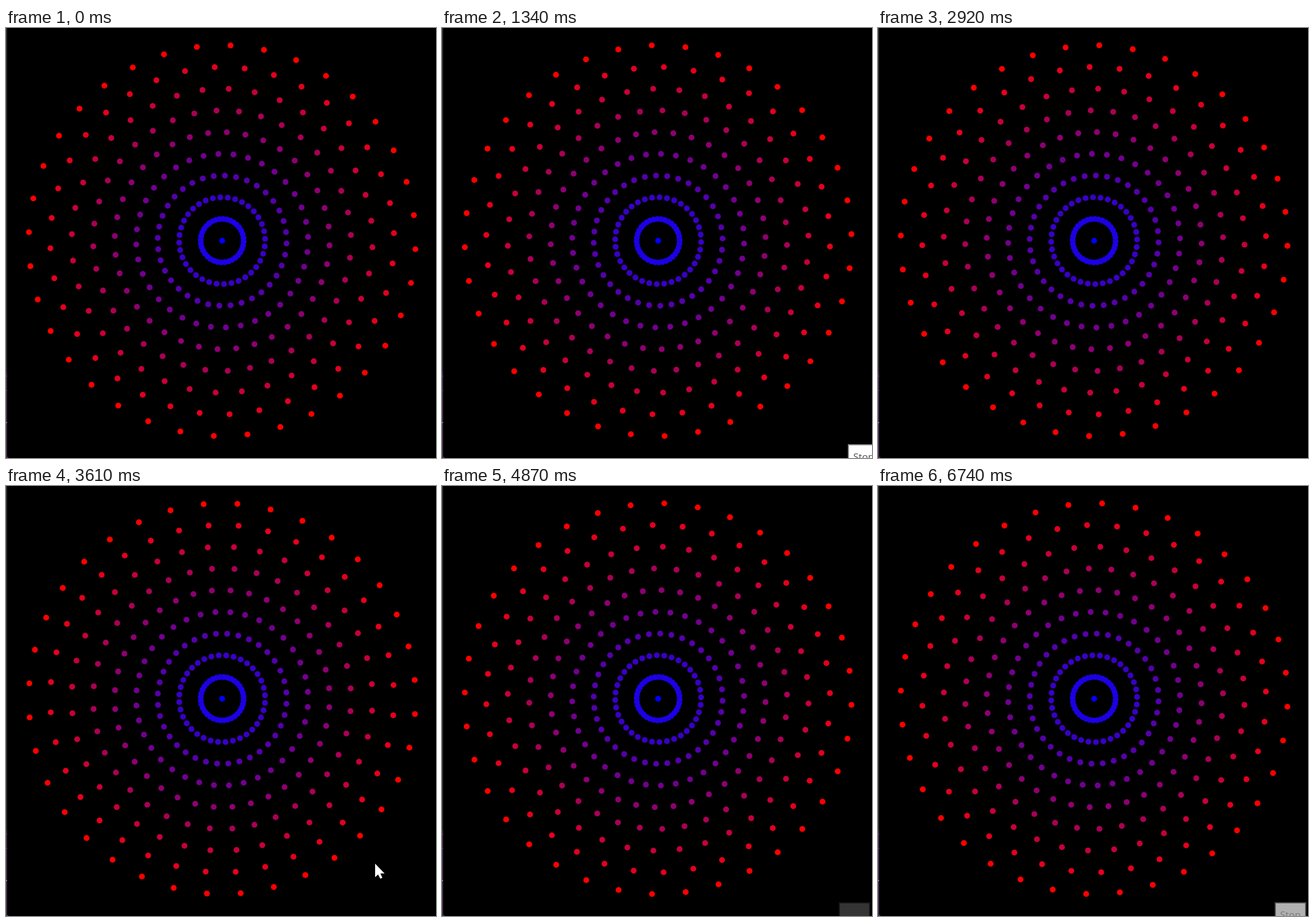
An HTML page with a canvas that plays this animation: 748x748 px, repeating every 6.77 s.

```html
<!DOCTYPE html>
<html lang="en">
<head>
<meta charset="utf-8">
<title>Counter-rotating rings</title>
<style>
  html, body { margin: 0; width: 100%; height: 100%; overflow: hidden; background: #000; }
  canvas { display: block; }
</style>
</head>
<body>
<canvas id="stage" width="748" height="748"></canvas>
<script>
const ctx = document.getElementById('stage').getContext('2d');
const LOOP = 6770, RINGS = 9, DOTS = 36;

// [time in ms, degrees turned]: a nearly steady turn
const TURN = [[0, 2.495], [1340, -11.89], [2200, -21.17], [3610, -35.48],
              [4870, -48.18], [5740, -57.5], [6740, -67.63], [6770, -67.94]];
// [time in ms, x, y] of the pointer tip
const POINTER = [[3150, 705, 752], [3440, 717, 706], [3610, 642, 657],
                 [4140, 690, 694], [4400, 717, 752]];

const clamp = v => Math.max(0, Math.min(1, v));

function track(keys, t, column = 1) {
  const i = Math.max(1, keys.findIndex(k => k[0] >= t));
  const a = keys[i - 1], b = keys[i];
  return a[column] + (b[column] - a[column]) * (t - a[0]) / (b[0] - a[0]);
}

function rect(color, x, y, w, h) {
  ctx.fillStyle = color;
  ctx.fillRect(x, y, w, h);
}

function drawEdge() {
  rect('#303030', 0, 0, 2, 598);
  rect('#44304c', 0, 598, 2, 148);
  rect('#7058b0', 0, 605, 2, 1);
  rect('#7058b0', 0, 630, 2, 1);
  rect('#c8c0cc', 0, 686, 2, 1);
  rect('#44304c', 0, 746, 4, 2);
}

function drawRings(turn) {
  for (let ring = 0; ring <= RINGS; ring++) {
    const mix = ring / RINGS;
    const dir = ring % 2 ? 1 : -1;
    ctx.fillStyle = `rgb(${Math.round(255 * mix)},0,${Math.round(255 * (1 - mix))})`;
    for (let i = 0; i < (ring ? DOTS : 1); i++) {
      const a = (dir * turn + i * 360 / DOTS) * Math.PI / 180;
      ctx.beginPath();
      ctx.arc(376 + 37.38 * ring * Math.sin(a), 370 - 37.77 * ring * Math.cos(a), 5.1, 0, 7);
      ctx.fill();
    }
  }
}

function drawTip(x, start, t) {
  const alpha = Math.min(clamp((t - start) / 200), clamp((start + 2010 - t) / 200));
  if (!alpha) return;
  ctx.globalAlpha = alpha;
  rect('#8a8a8a', x, 724, 55, 30);
  rect('#fff', x + 2, 726, 51, 30);
  ctx.fillStyle = '#505050';
  ctx.font = '17px "Open Sans", "Noto Sans", sans-serif';
  ctx.fillText('Stop', x + 9.5, 751.5);
  ctx.globalAlpha = 1;
}

function drawPointer(t) {
  if (t < POINTER[0][0] || t > POINTER[POINTER.length - 1][0]) return;
  ctx.save();
  ctx.translate(track(POINTER, t, 1), track(POINTER, t, 2));
  ctx.fillStyle = '#fff';
  ctx.fill(new Path2D('M0 0V23.5L5.2 18.6L9 26L12.6 24.4L9.2 17H16.5Z'));
  ctx.restore();
}

function frame(now) {
  const t = now % LOOP;
  rect('#000', 0, 0, 748, 748);
  drawEdge();
  drawRings(track(TURN, t));
  drawTip(706, 450, t);
  drawTip(690, 4843, t);
  drawPointer(t);
  requestAnimationFrame(frame);
}
requestAnimationFrame(frame);
</script>
</body>
</html>
```
